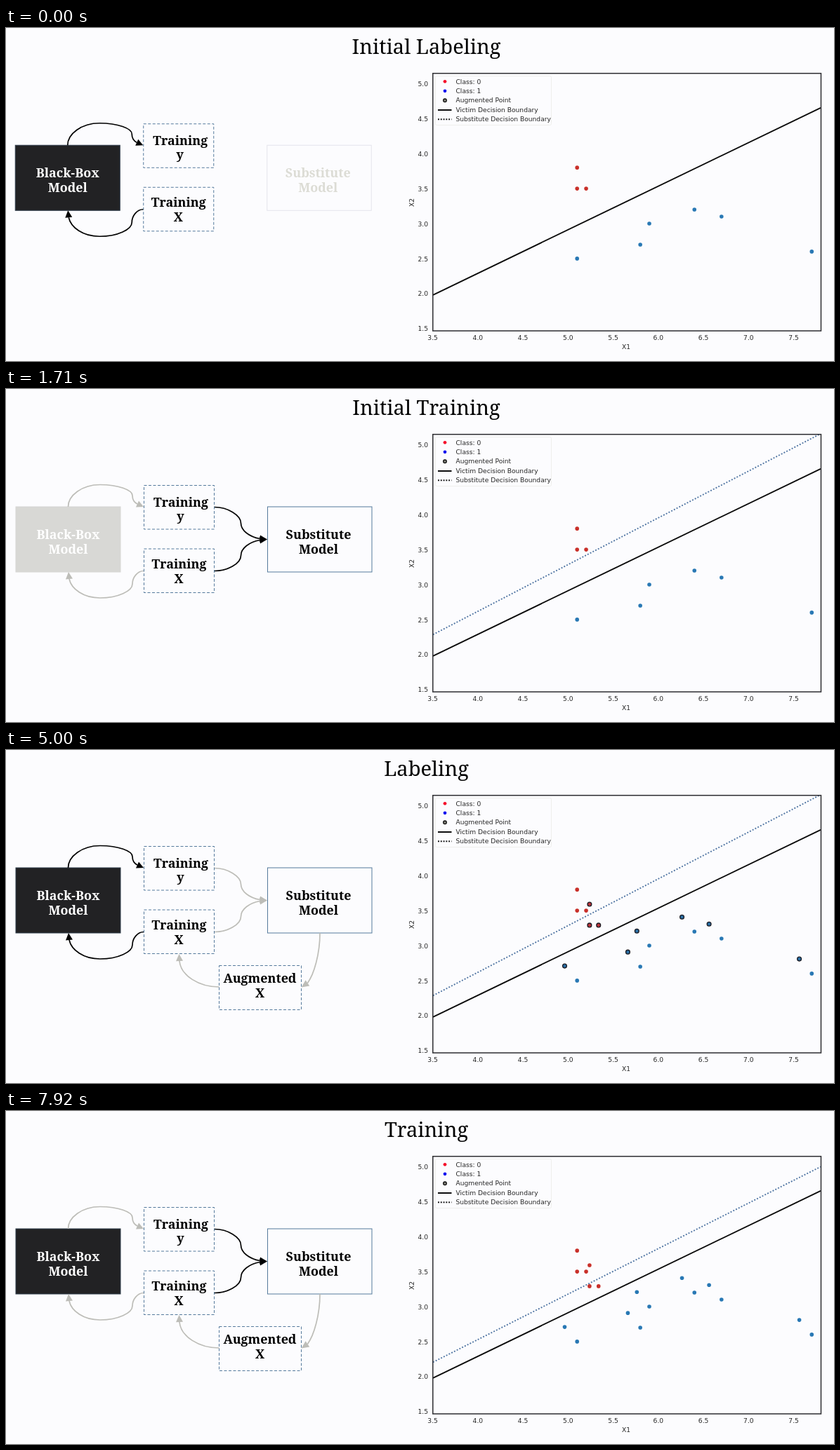
An HTML page that plays this animation: 1179 by 475 pixels, repeating every 8000 ms.

```html
<!DOCTYPE html>
<html lang="en">
<head>
<meta charset="utf-8">
<title>Substitute model training</title>
<style>
  html, body { margin: 0; width: 100%; height: 100%; overflow: hidden; background: #fcfcfe; }
  svg { display: block; width: 100vw; height: 100vh; }
  .serif { font-family: 'Noto Serif', serif; text-anchor: middle; }
  .bold { font-weight: bold; font-size: 17.9px; }
  .plot { font: 9.15px 'DejaVu Sans', sans-serif; fill: #262626; }
</style>
</head>
<body>
<svg id="stage" viewBox="0 0 1179 475"></svg>
<script>
const LOOP = 8000;
const INK = '#000', PALE = '#dcdcd5', GREY = '#bdbdb8', BLUE = '#557a9c';
const RED_DOT = '#c9302a', BLUE_DOT = '#2878b4';

// Link values are colours; a missing link is not drawn.
const stages = [
  { from: 0, title: 'Initial Labeling', shift: -0.75, dark: true, data: true, sub: false,
    query: INK },
  { from: 1580, title: 'Initial Training', dark: false, data: true, sub: true,
    query: GREY, train: INK, boundary: [350.3, 63.8] },
  { from: 3420, title: 'Initial Augmentation', dark: false, data: false, sub: true,
    query: GREY, train: GREY, augment: INK, boundary: [350.3, 63.8], points: 'moving' },
  { from: 5000, title: 'Labeling', dark: true, data: true, sub: true,
    query: INK, train: GREY, augment: GREY, merge: GREY, boundary: [350.3, 63.8], points: 'outlined' },
  { from: 6710, title: 'Training', dark: true, data: true, sub: true,
    query: GREY, train: INK, augment: GREY, merge: GREY, boundary: [358.3, 79.5], points: 'plain' }
];

const samples = [
  [5.1, 3.8], [5.1, 3.5], [5.2, 3.5],
  [5.1, 2.5], [5.8, 2.7], [5.9, 3.0], [6.4, 3.2], [6.7, 3.1], [7.7, 2.6]
];
const STEP = [17.7, 20.8];
const px = v => 607.6 + (v - 3.5) * 128.5;
const py = v => 79.4 + (5 - v) * 99.8;

const tag = (name, attrs, body = '') =>
  `<${name} ${Object.entries(attrs).map(([k, v]) => `${k}="${v}"`).join(' ')}>${body}</${name}>`;
const line = (x1, y1, x2, y2, stroke, width, extra = {}) =>
  tag('line', { x1, y1, x2, y2, stroke, 'stroke-width': width, ...extra });
const dot = (cx, cy, r, fill, edge = 'none') =>
  tag('circle', { cx, cy, r, fill, stroke: edge, 'stroke-width': 1.3 });
const plotText = (x, y, text, anchor = 'start', extra = {}) =>
  tag('text', { class: 'plot', x, y, 'text-anchor': anchor, ...extra }, text);
const label = (x, y, text, fill) => tag('text', { class: 'serif bold', x, y, fill }, text);

function box(x, y, width, height, stroke, dashed, fill = 'none') {
  return tag('rect', { x, y, width, height, fill, stroke, 'stroke-width': 1,
    'stroke-dasharray': dashed ? '4 2.5' : 'none' });
}

function head([bx, by], [tx, ty], half, fill) {
  const length = Math.hypot(tx - bx, ty - by);
  const nx = -(ty - by) / length * half, ny = (tx - bx) / length * half;
  return tag('path', { d: `M${tx} ${ty}L${bx + nx} ${by + ny}L${bx - nx} ${by - ny}Z`, fill });
}

function link(curve, base, tip, colour) {
  if (!colour) return '';
  return tag('path', { d: `${curve} ${base}`, fill: 'none', stroke: colour, 'stroke-width': 1.7 }) +
    head(base, tip, 5, colour);
}

function diagram(s) {
  const dataInk = s.data ? INK : PALE, dataEdge = s.data ? BLUE : '#e6e6dc';
  const subInk = s.sub ? INK : PALE;
  let out = box(14, 168, 149, 93, s.dark ? '#2c3a48' : '#d6d6d3', false, s.dark ? '#222224' : '#d8d8d5') +
    label(88.5, 214, 'Black-Box', '#fff') + label(88.5, 235, 'Model', '#fff') +
    box(196.5, 137.5, 100, 62.5, dataEdge, true) +
    label(249, 167.5, 'Training', dataInk) + label(248.5, 188, 'y', dataInk) +
    box(196.5, 228, 100, 62.5, dataEdge, true) +
    label(246.5, 255.5, 'Training', dataInk) + label(246, 276.5, 'X', dataInk) +
    box(372.5, 168, 148.5, 93, s.sub ? BLUE : '#e4e4ec', false) +
    label(445, 213.5, 'Substitute', subInk) + label(445, 234.5, 'Model', subInk);

  out += link('M88.5 168C88.5 152 108 136.5 134 136.5S180 144 180 152C180 158 183 162', [187, 164], [196, 168], s.query) +
    link('M196 259.5C187 259.5 180 269 180 278C180 288 160 298 134 298C110 298 93 285', [90, 271], [89, 261], s.query) +
    link('M297 168.5C315.5 168.5 334.5 180 334.5 191.5C334.5 202 347 211', [361.5, 213.5], [372, 214.5], s.train) +
    link('M297 259.5C315.5 259.5 334.5 249 334.5 237.5C334.5 227 347 218', [361.5, 215.5], [372, 214.5], s.train) +
    link('M447 261C447 291 438.5 320', [429.4, 332.4], [420.5, 338.5], s.augment) +
    link('M303.5 338C275 338 249 322', [247, 301], [246.5, 291], s.merge);

  if (s.augment) {
    out += box(303.5, 307.5, 117, 63, BLUE, true) +
      label(361.5, 332, 'Augmented', INK) + label(361.5, 353, 'X', INK);
  }
  return tag('g', { transform: `translate(${s.shift || 0} ${s.shift || 0})` }, out);
}

function axes() {
  let out = tag('rect', { x: 607.8, y: 64.7, width: 552.7, height: 367.3, fill: 'none', stroke: '#2c2c30', 'stroke-width': 1.5 });
  for (let v = 3.5; v <= 7.5; v += 0.5) out += plotText(px(v), 445, v.toFixed(1), 'middle');
  for (let v = 1.5; v <= 5; v += 0.5) out += plotText(601, py(v) + 3.6, v.toFixed(1), 'end');
  return out + plotText(883, 457.5, 'X1', 'middle') +
    plotText(0, 0, 'X2', 'middle', { transform: 'translate(580.5 249) rotate(-90)' });
}

function legend() {
  const names = ['Class: 0', 'Class: 1', 'Augmented Point', 'Victim Decision Boundary', 'Substitute Decision Boundary'];
  return tag('rect', { x: 611.5, y: 68.5, width: 165, height: 70, rx: 2, fill: '#fcfcfe', stroke: '#efefec' }) +
    names.map((name, i) => plotText(640.5, 79.5 + i * 13.45, name)).join('') +
    dot(625, 76.3, 2.4, '#f5122c') + dot(625, 89.8, 2.4, '#1212f0') + dot(625, 103.3, 2.3, '#85857c', '#111') +
    line(615, 117, 634.5, 117, INK, 1.9) +
    line(615, 130.3, 634.5, 130.3, '#141414', 1.9, { 'stroke-dasharray': '1.9 1.9' });
}

function points(s) {
  let moves = '', dots = '', added = '';
  samples.forEach(([vx, vy], i) => {
    const x = px(vx), y = py(vy), way = i < 3 ? 1 : -1;
    const colour = i < 3 ? RED_DOT : BLUE_DOT;
    const along = k => [x + way * STEP[0] * k, y + way * STEP[1] * k];
    const [ax, ay] = along(1);
    dots += dot(x, y, 2.8, colour);
    if (s.points === 'moving') {
      moves += line(x, y, ...along(0.7), '#222', 0.9) + head(along(0.55), along(0.89), 3.3, INK);
      added += dot(ax, ay, 3.1, '#77776f', '#111');
    } else if (s.points === 'outlined') {
      added += dot(ax, ay, 2.9, i < 3 ? '#b8343a' : '#2a6fa5', '#1a1a22');
    } else if (s.points) {
      added += dot(ax, ay, 2.8, colour);
    }
  });
  return dots + moves + added;
}

function chart(s) {
  const dotted = s.boundary
    ? line(608, s.boundary[0], 1160, s.boundary[1], '#4f74a2', 1.9,
      { 'stroke-dasharray': '1.9 2.3', 'clip-path': 'url(#frame)' })
    : '';
  return line(608, 380.8, 1160, 113.8, '#0c0c0c', 1.9) + dotted + points(s) + axes() + legend();
}

const clip = '<clipPath id="frame"><rect x="608" y="65" width="552" height="367"/></clipPath>';
const stage = document.getElementById('stage');
let shown = null;

function render(time) {
  const current = stages.filter(s => s.from <= time).pop();
  if (current === shown) return;
  shown = current;
  stage.innerHTML = clip +
    tag('text', { class: 'serif', x: 598.5, y: 37.3, 'font-size': 29.1 }, current.title) +
    diagram(current) + chart(current);
}

const start = performance.now();
function tick() {
  render((performance.now() - start) % LOOP);
  requestAnimationFrame(tick);
}
tick();
</script>
</body>
</html>
```
